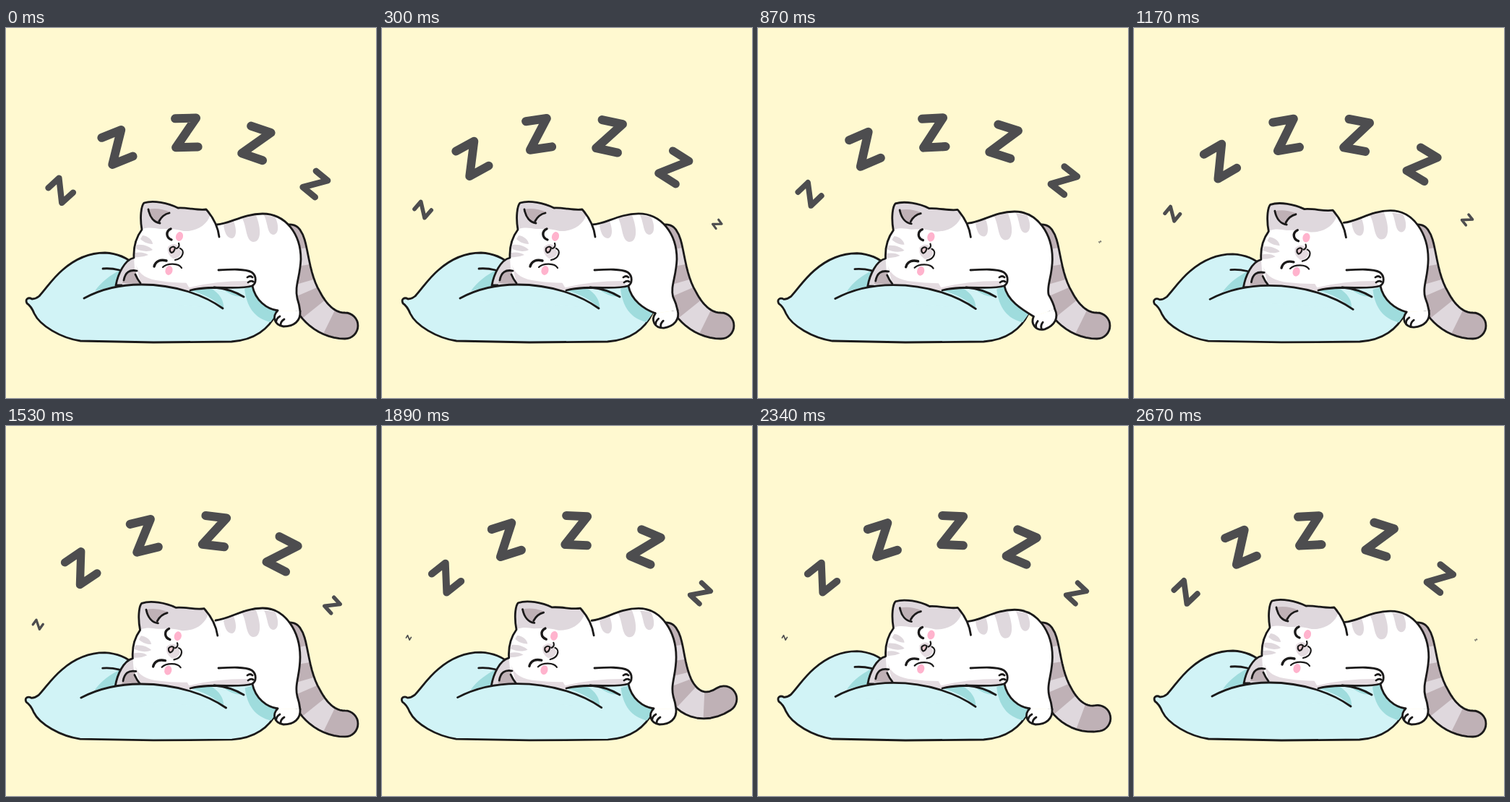
Recreate the animation shown at these times as an HTML page. Size 512 px wide and 512 px high, loop 2700 ms.

```html
<!DOCTYPE html>
<html lang="en">
<head>
<meta charset="utf-8">
<title>Sleeping cat</title>
<style>
html, body { margin: 0; width: 100%; height: 100%; overflow: hidden; background: #fff9d0; }
svg { display: block; width: 100%; height: 100%; }
.ink { fill: none; stroke: #1b1a1a; stroke-width: 2.8; stroke-linecap: round; stroke-linejoin: round; }
.bold { stroke-width: 3.4; }
.thin { stroke-width: 2.2; }
.white { fill: #fff; }
.grey { fill: #dfd8dd; }
.shade { fill: #e4dbe0; }
.dark { fill: #bfb1b6; }
.teal { fill: #9fdcdd; }
.pillow { fill: #d1f3f6; }
.pink { fill: #ffb3cd; }
</style>
</head>
<body>
<svg viewBox="0 0 512 512">
  <rect width="512" height="512" fill="#fff9d0"/>

  <g id="pillow">
    <path class="ink" style="fill:#d1f3f6" d="M29 381C26 375 31 372 36 375Q41 375 46 371C56 360 64 347 78 335C95 320 113 311 137 311C154 312 167 317 178 328L260 350L340 355L374 395C364 416 344 432 312 434L204 435L103 433C76 429 47 412 39 395Q35 385 29 381Z"/>
    <path class="teal" d="M123 364C132 351 144 342 160 334L152 357C143 359 133 361 123 364Z"/>
    <path class="ink" d="M134 333Q145 332 157 335"/>
    <path class="teal" d="M330 361C333 386 344 402 366 407L376 393L342 357Z"/>
  </g>

  <g id="tail">
    <path id="tailBase" class="dark"/>
    <path id="tailBands" class="grey"/>
    <path id="tailInk" class="ink"/>
  </g>

  <path id="bodyFill" class="white"/>
  <g id="stripes" class="grey">
    <path d="M301 273C303 286 307 291 313 291C320 289 319 276 314 265Z"/>
    <path d="M326 262C334 275 331 294 342 296C354 296 353 277 346 259L336 259Z"/>
    <path d="M357 259C363 271 361 285 370 286C379 285 377 270 372 261Z"/>
  </g>
  <path id="bodyInk" class="ink"/>
  <g id="paw">
    <path class="ink" style="fill:#fff" d="M407 392C408 405 399 413 384 413C371 411 368 399 376 391"/>
    <path class="ink" d="M379 399Q374 402 374 406M385 403Q380 406 380 411"/>
  </g>

  <g id="head">
    <path class="white" d="M152 356C155 340 164 321 177 318C176 300 182 287 188 279C185 262 187 246 191 242C204 238 224 242 238 249C251 248 266 253 277 251C285 260 293 273 295 289L310 330L290 359L250 364L187 357Z"/>
    <path class="shade" d="M180 328C184 342 196 348 214 350Q240 354 272 352L250 364L187 357Z"/>
    <path class="grey" d="M189 278C185 262 187 246 191 242C204 238 224 242 238 249C251 248 266 253 277 251L283 258C278 274 262 282 246 281C232 277 224 278 213 278C205 277 199 275 189 278Z"/>
    <path class="dark" d="M197 251C199 262 205 269 213 270Q216 259 228 255Q211 248 197 251Z"/>
    <path class="grey" d="M152 356C155 340 164 321 177 318L178 333Q181 345 187 354Z"/>
    <path class="dark" d="M161 353C163 342 170 335 181 335L179 341L186 354Z"/>
    <path class="grey" d="M189 287C197 288 203 294 203 299C195 299 189 295 186 292ZM181 300C191 299 199 303 203 307C195 311 185 308 179 305ZM178 311Q190 309 197 314Q188 318 178 317Z"/>
    <path class="shade" d="M224 303Q233 295 239 303L243 311Q239 320 231 319Q222 313 224 303Z"/>
    <ellipse class="pink" cx="240" cy="288.500" rx="5" ry="6.500" transform="rotate(15 240 288.500)"/>
    <ellipse class="pink" cx="225.500" cy="335.500" rx="5" ry="6.500" transform="rotate(15 225.500 335.500)"/>
    <path class="ink" d="M152 356C155 340 164 321 177 318C176 300 182 287 188 279C185 262 187 246 191 242C204 238 224 242 238 249C251 248 266 253 277 251C285 260 293 273 295 289M152 356L160 356"/>
    <path class="ink" d="M197 251C199 262 205 269 213 270M212 267Q217 258 226 256M163 349C165 338 171 334 181 336M179 341Q182 348 186 353"/>
    <path class="ink bold" d="M228 278C221 281 221 290 229 293M205 330C207 322 214 320 222 322"/>
    <path class="ink thin" style="fill:#e6c8cd" d="M227 305Q231 301 234 304Q233 310 229 311Q226 309 227 305Z"/>
    <path class="ink thin" d="M239 298Q241 303 236 305M241 305C248 308 245 319 234 321M217 331C223 325 239 325 243 332"/>
  </g>

  <g id="arm">
    <path class="white" d="M294 335C312 334 331 333 340 338C347 343 347 354 340 357C322 363 285 359 255 362L245 345Z"/>
    <path class="shade" d="M247 361Q285 350 333 350L340 357C322 362 285 359 255 363Z"/>
    <path class="teal" d="M254 363C275 368 290 377 302 389L312 376L329 372C316 365 300 360 283 360Z" opacity="0"/>
    <path class="teal" d="M254 363C275 368 290 377 301 388C302 378 296 367 283 360Z"/>
    <path class="teal" d="M300 361Q315 365 329 372Q314 373 300 361Z"/>
    <path class="ink" d="M294 335C312 334 331 333 340 338C347 343 347 354 340 357C322 363 285 355 255 363M288 359Q311 361 329 372M334 345Q338 342 341 345M335 352Q339 349 342 351"/>
  </g>

  <g id="crease">
    <path class="pillow" d="M108 374C130 362 155 355 187 355C235 355 275 370 300 388Z"/>
    <path class="ink" d="M108 374C130 362 155 355 187 355C235 355 275 370 300 388"/>
  </g>

  <g id="zs" fill="none" stroke="#4d4d4f" stroke-width="12" stroke-linecap="round" stroke-linejoin="round"></g>
</svg>
<script>
const LOOP = 2700, STEP = 30, COUNT = 6, FRAMES = LOOP / STEP;
const RAD = Math.PI / 180;
const $ = id => document.getElementById(id);
const set = (id, name, value) => $(id).setAttribute(name, value);

const letters = Array.from({ length: COUNT }, () => {
  const z = document.createElementNS("http://www.w3.org/2000/svg", "path");
  z.setAttribute("d", "M-15 -20H14L-15 20H15.5");
  return $("zs").appendChild(z);
});

// Smooth rise and fall around a moment, zero outside its half-width.
function bump(t, mid, half) {
  const x = (t - mid) / half;
  return Math.abs(x) < 1 ? (1 + Math.cos(Math.PI * x)) / 2 : 0;
}

function drawLetters(frame) {
  letters.forEach((z, k) => {
    const p = (frame + k * FRAMES / COUNT) % FRAMES;
    const a = -1.2 + 1.6 * (p - 45);
    const b = Math.sin(2.6 * a * RAD);
    const r = 234 + 4 * Math.abs(b) + b;
    const x = 254.5 + r * Math.sin(a * RAD);
    const y = 379 - r * Math.cos(a * RAD);
    const grow = Math.min(p, FRAMES + 0.5 - p) / 21.5;
    const s = grow / Math.pow(1 + Math.pow(grow, 12), 1 / 12);
    z.setAttribute("visibility", s > 0 ? "visible" : "hidden");
    z.setAttribute("transform", `translate(${x} ${y}) rotate(${0.85 * a - 0.5}) scale(${s})`);
  });
}

function bezier(p, t) {
  const q = 1 - t;
  const w = [q * q * q, 3 * q * q * t, 3 * q * t * t, t * t * t];
  const v = [q * q, 2 * q * t, t * t];
  const at = i => w.reduce((sum, n, j) => sum + n * p[j][i], 0);
  const slope = i => v.reduce((sum, n, j) => sum + n * (p[j + 1][i] - p[j][i]), 0);
  return { x: at(0), y: at(1), a: Math.atan2(slope(1), slope(0)) };
}

// The tail is a ribbon around two joined curves, thickest past the middle.
function drawTail(u) {
  const joint = [416 - 5 * u, 374 - 12 * u];
  const upper = [[393, 289], [402, 301], [400 - u, 345 - 8 * u], joint];
  const lower = [joint, [427 - 7 * u, 396 - 18 * u], [446 - 3 * u, 412 - 17 * u], [469 + 4.5 * u, 412 - 39 * u]];
  const edge = (s, side) => {
    const c = s < 1 ? bezier(upper, s) : bezier(lower, s - 1);
    const w = 17 + 0.5 * s + 3 * Math.pow(Math.sin(Math.PI * s / 2), 2) * (s < 1 ? s : 1);
    return `${c.x - side * w * Math.sin(c.a)} ${c.y + side * w * Math.cos(c.a)}`;
  };
  const run = (from, to, side) =>
    Array.from({ length: 25 }, (_, i) => edge(from + (to - from) * i / 24, side)).join("L");
  const ribbon = (from, to, cap) => `M${run(from, to, -1)}${cap}${run(to, from, 1)}`;
  const outline = ribbon(0, 2, "A18 18 0 0 1 ") + `A17 17 0 0 1 ${edge(0, -1)}Z`;
  set("tailBase", "d", outline);
  set("tailInk", "d", outline);
  set("tailBands", "d", [[0.3, 0.55], [0.78, 0.92], [1.25, 1.66]].map(([from, to]) => ribbon(from, to, "L") + "Z").join(""));
}

function drawBody(b, kick) {
  const turn = -25 * kick * RAD, dx = 7 * kick, dy = 3 * kick;
  const ankle = (x, y) => {
    const u = x - 391, v = y - 395;
    return `${391 + dx + u * Math.cos(turn) - v * Math.sin(turn)} ${395 + dy + u * Math.sin(turn) + v * Math.cos(turn)}`;
  };
  const back = `M${292 - 2 * b} ${272 - 3 * b}C310 ${271 - 4 * b} 328 ${257 - 5 * b} 355 ${257 - 5 * b}`
    + `C387 ${257 - 5 * b} ${408 - b} 285 ${408 - b} 320`
    + `C407 345 399 357 ${403 - kick} ${374 - 6 * kick}Q${406 + 3 * kick} ${383 - 4 * kick} ${ankle(407, 392)}`;
  const front = `${ankle(376, 391)}C${361 + 4 * kick} 389 345 377 341 357`;
  set("bodyFill", "d", `${back}L${front}L260 362L240 320Z`);
  set("bodyInk", "d", `${back}M${front}`);
  set("stripes", "transform", `translate(0 ${-4 * b})`);
  set("paw", "transform", `translate(${dx} ${dy}) rotate(${-25 * kick} 391 395)`);
}

function draw(t) {
  const sink = bump(t, 1580, 1100);
  const breath = Math.pow(bump(t, 1580, 1300), 0.6);
  drawLetters(t / STEP);
  drawTail(bump(t, 2000, 480));
  drawBody(breath, bump(t, 690, 690));
  set("head", "transform", `translate(${-2 * sink} ${2.6 * sink}) rotate(${-1.2 * sink} 225 300)`);
  set("pillow", "transform", `translate(${-204 * 0.005 * sink} ${434 * 0.022 * sink}) scale(${1 + 0.005 * sink} ${1 - 0.022 * sink})`);
  set("crease", "transform", `translate(${-200 * 0.045 * sink} ${2 * sink}) scale(${1 + 0.045 * sink} 1)`);
}

function tick() {
  draw(Math.floor(performance.now() % LOOP / STEP) * STEP);
  requestAnimationFrame(tick);
}
tick();
</script>
</body>
</html>
```
